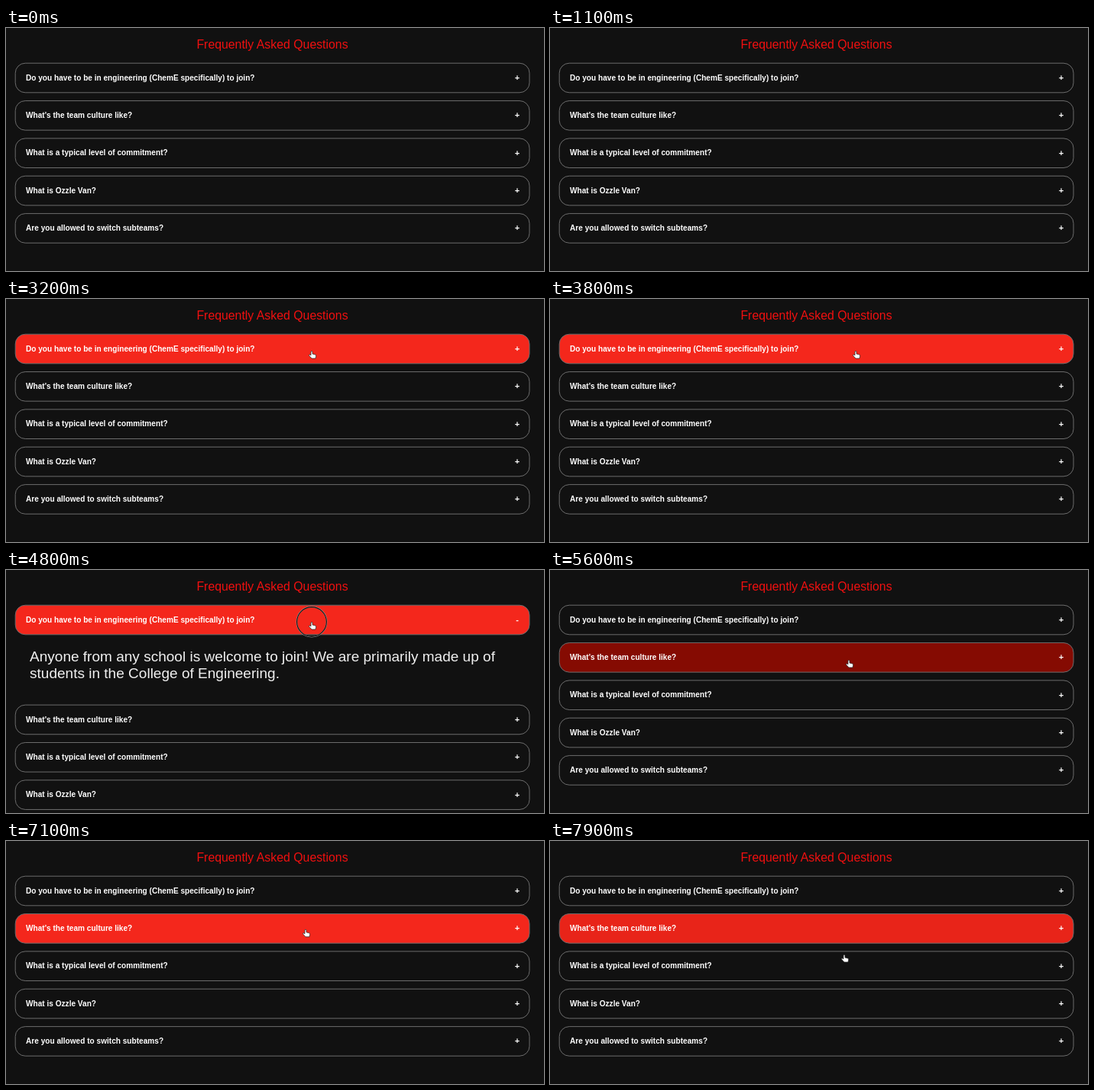
Animation, 704 px wide and 319 px high, one loop 8 s. Source, as an HTML page:

```html
<!DOCTYPE html>
<html lang="en">
<head>
<meta charset="utf-8">
<title>Frequently Asked Questions</title>
<style>
html, body { margin: 0; width: 100%; height: 100%; overflow: hidden; background: #111; }
svg { display: block; font-family: "Liberation Sans", Arial, sans-serif; }
.title { font-size: 15.85px; fill: #f01010; text-anchor: middle; }
.box { stroke: #6c6c6c; stroke-width: 1; }
.question, .sign { font-size: 10.1px; font-weight: bold; fill: #fff; }
.sign { font-size: 11px; text-anchor: middle; }
.answer { font-size: 19.05px; fill: #f0f0f0; }
</style>
</head>
<body>
<svg id="stage" width="704" height="319" viewBox="0 0 704 319">
  <text class="title" x="348.5" y="27">Frequently Asked Questions</text>
  <g id="list"></g>
  <g id="cursor">
    <g id="ring" fill="none">
      <circle r="19.6" stroke="#999" stroke-width="1.6"/>
      <circle r="19.4" stroke="#111" stroke-width="1.1"/>
    </g>
    <path id="arrow" d="M0 0V9.6L2.2 7.6L3.8 11.2L5.4 10.5L3.9 7H7Z" fill="#111" stroke="#ddd" stroke-width=".9"/>
    <path id="hand" d="M-1 1Q0 -.6 1 1V4L4.5 5Q6 5 5.7 7L5 10H0L-3.4 6.2Q-3.6 4.6 -2.2 5L-1 6Z" fill="#fff" stroke="#222" stroke-width=".7"/>
  </g>
</svg>
<script>
const LOOP = 8000, STEP = 100, TOP = 46.2, PITCH = 49.35, BOX_H = 38.6, LINE = 21.8;
const HOVER_MS = 400, PANEL_MS = 200;

// hover and open are [start, end] times in ms
const items = [
  { q: "Do you have to be in engineering (ChemE specifically) to join?",
    a: ["Anyone from any school is welcome to join! We are primarily made up of",
        "students in the College of Engineering."],
    hover: [2250, 5150], open: [4200, 4900] },
  { q: "What's the team culture like?",
    a: ["We have a big emphasis on teamwork. Nothing is ever done alone, and to",
        "adhere to lab safety, no research or development is ever done without",
        "help. We have a structure of many subteams so that we can all work",
        "together most efficiently."],
    hover: [5470, 7890], open: [6100, 6700] },
  { q: "What is a typical level of commitment?" },
  { q: "What is Ozzle Van?" },
  { q: "Are you allowed to switch subteams?" }
];
const path = [ // time, x, y of the pointer tip
  [1900, 409, -12], [2200, 405.5, 46.5], [2500, 400, 68], [5000, 400, 68],
  [5150, 399, 87], [5400, 394, 93], [5600, 391, 118], [5800, 392, 115.5],
  [7700, 392, 116], [7900, 385, 149]
];
const presses = [[4000, 4200], [4700, 4900], [5900, 6100], [6500, 6700]];
const shades = [[17, 17, 17], [122, 8, 0], [244, 39, 28]];

const $ = id => document.getElementById(id);
const clamp = v => Math.max(0, Math.min(1, v));
const easeOut = v => 1 - (1 - clamp(v)) ** 2;
const within = (t, [from, to]) => t >= from && t < to;
const show = (el, on) => el.setAttribute("visibility", on ? "visible" : "hidden");
const fade = (t, span, ms) =>
  span ? easeOut((t - span[0]) / ms) - easeOut((t - span[1]) / ms) : 0;

function add(parent, tag, attrs, text = "") {
  const el = document.createElementNS("http://www.w3.org/2000/svg", tag);
  for (const k in attrs) el.setAttribute(k, attrs[k]);
  el.textContent = text;
  return parent.appendChild(el);
}

function shade(p) {
  const i = p < 0.5 ? 0 : 1, f = p * 2 - i;
  return `rgb(${shades[i].map((c, k) => Math.round(c + (shades[i + 1][k] - c) * f))})`;
}

function pointerAt(t) {
  const i = Math.max(1, path.findIndex(p => p[0] >= t));
  const a = path[i - 1], b = path[i], f = clamp((t - a[0]) / (b[0] - a[0]));
  return [a[1] + (b[1] - a[1]) * f, a[2] + (b[2] - a[2]) * f];
}

for (const it of items) {
  it.g = add($("list"), "g", {});
  it.box = add(it.g, "rect", { class: "box", x: 12.2, width: 672.8, height: BOX_H, rx: 13 });
  add(it.g, "text", { class: "question", x: 26, y: 22.6 }, it.q);
  it.sign = add(it.g, "text", { class: "sign", x: 669, y: 22.8 });
  it.panel = add(it.g, "svg", { y: BOX_H, width: 704, height: 0 });
  (it.a || []).forEach((line, n) =>
    add(it.panel, "text", { class: "answer", x: 31, y: 35.7 + n * LINE }, line));
}

function draw(now) {
  const t = Math.floor(now % LOOP / STEP) * STEP;
  let y = TOP;
  for (const it of items) {
    const h = it.a ? (38 + it.a.length * LINE) * fade(t, it.open, PANEL_MS) : 0;
    it.g.setAttribute("transform", `translate(0 ${y})`);
    it.box.setAttribute("fill", shade(fade(t, it.hover, HOVER_MS)));
    it.panel.setAttribute("height", h);
    it.sign.textContent = it.open && within(t, it.open) ? "-" : "+";
    y += PITCH + h;
  }
  const hand = t >= 2250 && !within(t, [5150, 5470]);
  $("cursor").setAttribute("transform", `translate(${pointerAt(t)})`);
  show($("hand"), t >= 1900 && hand);
  show($("arrow"), t >= 1900 && !hand);
  show($("ring"), presses.some(p => within(t, p)));
}

const start = performance.now();
function tick() {
  draw(performance.now() - start);
  requestAnimationFrame(tick);
}
tick();
</script>
</body>
</html>
```
